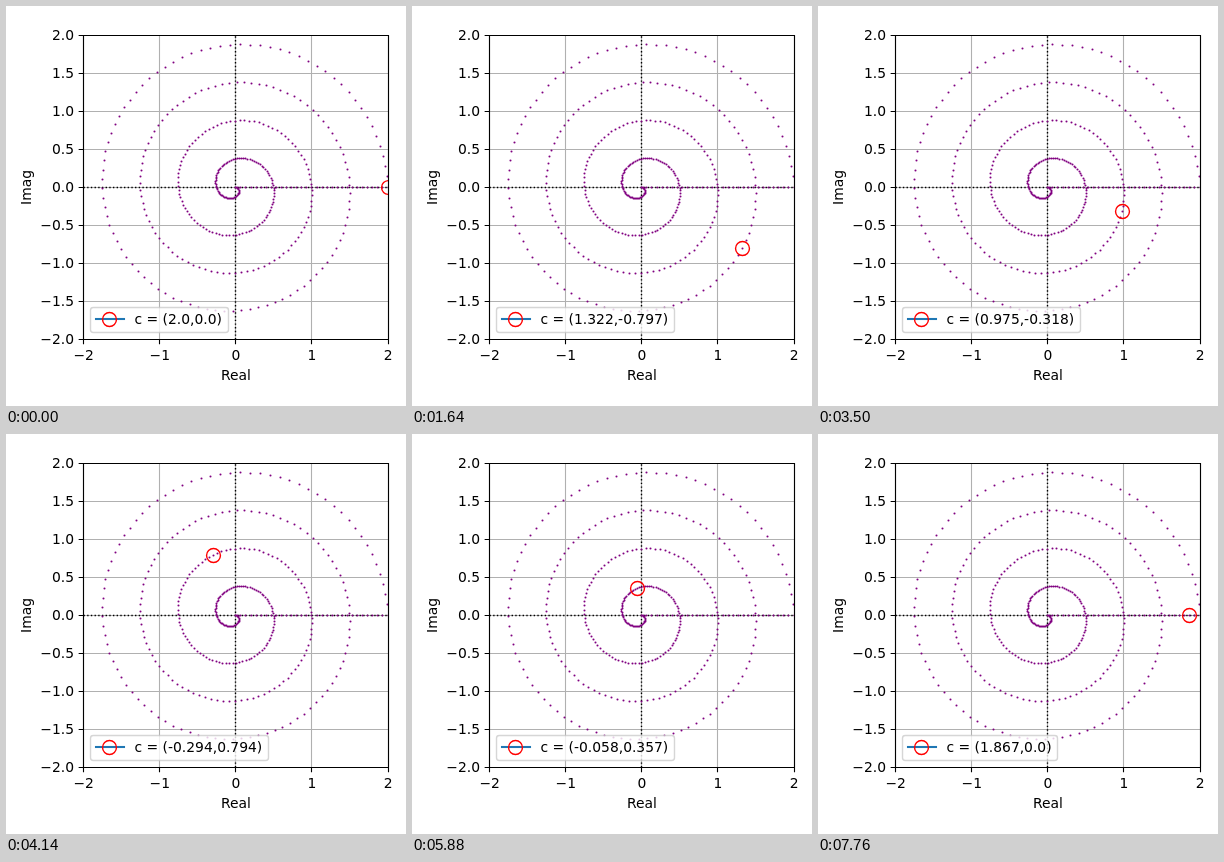
These frames come from a looping animation (400x400 px, 7780 ms). An HTML page:

```html
<!DOCTYPE html>
<html lang="en">
<head>
<meta charset="utf-8">
<title>Spiral in the complex plane</title>
<style>
  html, body { margin: 0; width: 100%; height: 100%; overflow: hidden; background: #fff; }
  svg { display: block; width: 400px; height: 400px; }
  text { font: 13.889px "DejaVu Sans", Verdana, sans-serif; fill: #000; white-space: pre; }
</style>
</head>
<body>
<svg id="stage" viewBox="0 0 400 400" xmlns="http://www.w3.org/2000/svg">
  <clipPath id="plot"><rect x="78" y="29" width="304" height="305"/></clipPath>
</svg>
<script>
const FRAME_MS = 20, FRAMES = 389;
const SPIRAL_STEPS = 359, TURNS = 4, LINE_STEPS = 30;
const ORIGIN = { x: 229.85, y: 181.6 }, SCALE = 76.1;
const LEFT = 77.5, RIGHT = 382.5, TOP = 29.5, BOTTOM = 333.5;
const POINT = 100 / 72;

const stage = document.getElementById('stage');

function add(tag, attrs, content) {
  const el = document.createElementNS('http://www.w3.org/2000/svg', tag);
  for (const name in attrs) el.setAttribute(name, attrs[name]);
  if (content !== undefined) el.textContent = content;
  stage.appendChild(el);
  return el;
}

const snap = v => Math.floor(v) + 0.5;
const px = x => snap(ORIGIN.x + x * SCALE);
const py = y => snap(ORIGIN.y - y * SCALE);
const stroke = (d, color, width, extra) =>
  add('path', { d, fill: 'none', stroke: color, 'stroke-width': width * POINT, ...extra });
const ring = (cx, cy, extra) =>
  add('circle', { cx, cy, r: 5 * POINT, fill: 'none', stroke: '#f00', 'stroke-width': POINT, ...extra });

// Inward spiral first, then back out along the real axis.
function position(i) {
  if (i > SPIRAL_STEPS) return [(i - SPIRAL_STEPS - 1) * 2 / LINE_STEPS, 0];
  const angle = TURNS * 2 * Math.PI * i / SPIRAL_STEPS;
  const radius = 2 - 2 * i / SPIRAL_STEPS;
  return [radius * Math.cos(angle), radius * Math.sin(angle)];
}

// Three decimals, trailing zeros dropped, sign of zero kept.
function format(v) {
  const sign = v < 0 || Object.is(v, -0) ? '-' : '';
  return sign + Math.abs(v).toFixed(3).replace(/(\.\d+?)0+$/, '$1');
}

const label = v => String(v).replace('-', '\u2212');
const xTicks = [-2, -1, 0, 1, 2];
const yTicks = Array.from({ length: 9 }, (_, i) => 2 - i / 2);

// Grid
stroke(xTicks.map(x => `M${px(x)} ${TOP}V${BOTTOM}`).join('') +
       yTicks.map(y => `M${LEFT} ${py(y)}H${RIGHT}`).join(''), '#b0b0b0', 0.8);

// Zero lines
stroke(`M${LEFT} ${py(0)}H${RIGHT}M${px(0)} ${BOTTOM}V${TOP}`, '#000', 1,
       { 'stroke-dasharray': `${POINT} ${1.65 * POINT}`, 'clip-path': 'url(#plot)' });

// Trail of all positions
let dots = '';
for (let i = 0; i <= SPIRAL_STEPS + LINE_STEPS; i++) {
  const [x, y] = position(i);
  dots += `M${px(x)} ${py(y)}h0`;
}
stroke(dots, '#800080', 1.5, { 'stroke-linecap': 'round', 'clip-path': 'url(#plot)' });

const clipped = add('g', { 'clip-path': 'url(#plot)' });
const marker = ring(0, 0);
clipped.appendChild(marker);

// Frame, ticks and labels
stroke(`M${LEFT} ${TOP}H${RIGHT}V${BOTTOM}H${LEFT}Z`, '#000', 0.8);
stroke(xTicks.map(x => `M${px(x)} ${BOTTOM}v4.86`).join('') +
       yTicks.map(y => `M${LEFT} ${py(y)}h-4.86`).join(''), '#000', 0.8);
for (const x of xTicks)
  add('text', { x: ORIGIN.x + x * SCALE, y: 354, 'text-anchor': 'middle' }, label(x));
for (const y of yTicks)
  add('text', { x: 68, y: py(y) + 4.5, 'text-anchor': 'end' }, label(y.toFixed(1)));
add('text', { x: ORIGIN.x, y: 374, 'text-anchor': 'middle' }, 'Real');
add('text', { transform: 'translate(25 181.5) rotate(-90)', 'text-anchor': 'middle' }, 'Imag');

// Legend
const legend = add('rect', { x: 84.5, y: 301.5, height: 25, rx: 2.78, fill: '#fff',
  stroke: '#ccc', 'stroke-width': POINT, opacity: 0.8 });
stroke('M90 313H118', '#1f77b4', 1.5, { 'stroke-linecap': 'square' });
ring(103.5, 313.5);
const caption = add('text', { x: 128.5, y: 318 });

let shown = -1;
function draw(time) {
  const i = Math.floor(time / FRAME_MS) % FRAMES;
  if (i === shown) return;
  shown = i;
  const [x, y] = position(i);
  marker.setAttribute('cx', px(x));
  marker.setAttribute('cy', py(y));
  caption.textContent = `c = (${format(x)},${format(y)})`;
  const right = snap(129 + caption.getComputedTextLength() + 5.56);
  legend.setAttribute('width', right - 84.5);
}

const start = performance.now();
function tick() {
  draw(performance.now() - start);
  requestAnimationFrame(tick);
}
tick();
</script>
</body>
</html>
```
